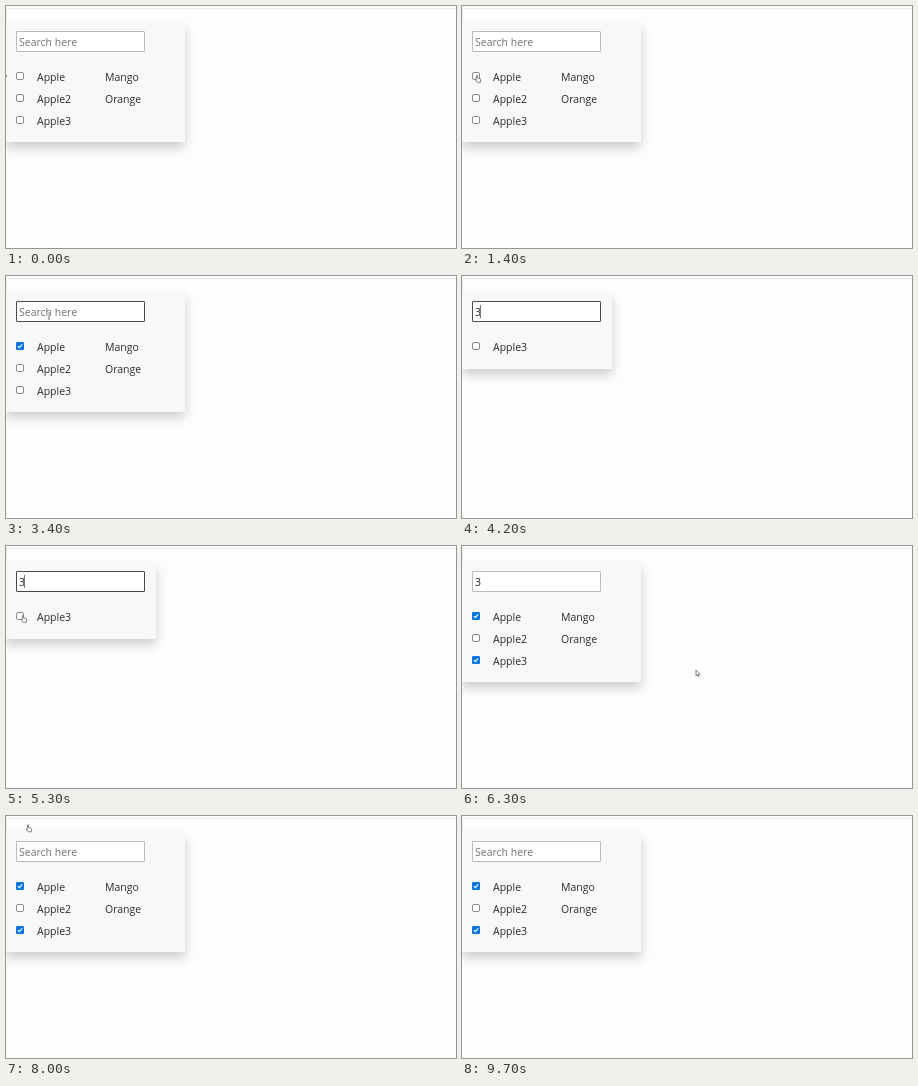
Animation of 450 by 242 pixels, one loop 9.8 s. Source, as an HTML page:

```html
<!DOCTYPE html>
<html lang="en">
<head>
<meta charset="utf-8">
<title>Searchable checkbox dropdown</title>
<style>
  html, body { margin: 0; width: 100%; height: 100%; overflow: hidden; background: #fdfdfe; }
  #stage { position: relative; width: 450px; height: 242px; overflow: hidden;
    font: 10.5px/16px "Open Sans", "Noto Sans", sans-serif; color: #2b2b2b; white-space: pre; }
  #stage * { position: absolute; box-sizing: border-box; }
  .rule { left: 0; top: 2px; width: 450px; height: 1px;
    background: repeating-linear-gradient(90deg, #e2e2e2 0 1px, #f5f5f5 1px 2px); }
  .edge { left: 0; top: 2px; width: 1px; height: 14px;
    background: repeating-linear-gradient(#e0e0e0 0 1px, #f6f6f6 1px 2px); }
  #panel { left: 0; top: 16px; background: #f8f8f8; box-shadow: 0 5.5px 11px rgba(0, 0, 0, .2); }
  #search { left: 10px; top: 9px; width: 129px; height: 21px; border: 1px solid #bcbcbc;
    border-radius: 1px; background: #fff; }
  #search.focus { border-color: #4a4a4a; }
  #query { left: 2px; top: 2px; }
  #caret { top: 3px; width: 1px; height: 13px; background: #777; }
  .label { height: 16px; }
  .box { left: 10px; width: 8px; height: 8px; border: 1px solid #8c8c8c; border-radius: 2px; background: #fff; }
  .box.on { border-color: #0874e0; border-radius: 1px; background: #0874e0; }
  .box svg { left: -1px; top: -1px; width: 8px; height: 8px; display: none; }
  .box.on svg { display: block; }
  #button { left: -1px; top: 2px; width: 84px; height: 19px; border: 1px solid #8f9296; background: #eef5fd; }
  #button span { left: 0; top: 1px; }
  #pointer { left: 0; top: 0; width: 12px; height: 14px; overflow: visible; }
</style>
</head>
<body>
<div id="stage">
  <div class="rule"></div>
  <div id="button"><span>2 values selected</span></div>
  <div id="panel">
    <div id="search"><span id="query"></span><i id="caret"></i></div>
  </div>
  <div class="edge" id="edge"></div>
  <svg id="pointer"><path id="shape" fill="#fff" stroke="#666" stroke-width=".8" stroke-linejoin="round"/></svg>
</div>
<script>
const LOOP = 9800, STEP = 100;
const $ = id => document.getElementById(id);
const panel = $('panel'), search = $('search'), query = $('query');

const SHAPES = {
  arrow: 'M0 0V5.8L1.4 4.6 2.2 6.6 3 6.2 2.2 4.3H4Z',
  hand: 'M-.6 0Q0-.9 .6 0V2.6L3.2 3.3Q3.9 3.6 3.7 4.4L3.3 6.8H.2L-1.7 4.2Q-1.5 3.3-.6 4.1Z',
  beam: 'M-1 4H1M0-3V4'
};

// time, x, y, shape from that time on
const PATH = [
  [0, -3, 66, 'arrow'], [100, -3, 66, 'arrow'], [800, 15, 69.5, 'hand'],
  [2300, 15, 69.5, 'arrow'], [2800, 43, 39, 'beam'], [3900, 43, 39, ''],
  [4500, 43, 39, 'beam'], [4700, 36, 49, 'arrow'], [5200, 17, 69.5, 'hand'],
  [5600, 17, 69.5, 'arrow'], [6200, 234, 124, 'arrow'], [6600, 234, 124, 'arrow'],
  [7200, 22, 9, 'hand'], [8400, 22, 9, 'arrow'], [9100, 203, 60, 'arrow'], [9300, 203, 60, '']
];

const ITEMS = [['Apple', 31, 0], ['Apple2', 31, 1], ['Apple3', 31, 2], ['Mango', 99, 0], ['Orange', 99, 1]]
  .map(([name, x, row]) => {
    const label = document.createElement('span');
    label.className = 'label';
    label.textContent = name;
    label.style.left = x + 'px';
    panel.append(label);
    let box = null;
    if (x === 31) {
      box = document.createElement('i');
      box.className = 'box';
      box.innerHTML = '<svg viewBox="0 0 9 9"><path d="M2 4.7 3.8 6.4 7 2.7" fill="none" stroke="#fff" stroke-width="1.3"/></svg>';
      panel.append(box);
    }
    return { name, row, label, box };
  });

const show = (el, on) => { el.style.display = on ? '' : 'none'; };

function movePointer(t) {
  let i = PATH.length - 1;
  while (PATH[i][0] > t) i--;
  const [t0, x0, y0, kind] = PATH[i];
  const [t1, x1, y1] = PATH[i + 1] || [LOOP, x0, y0];
  const p = (t - t0) / (t1 - t0), e = p * p * (3 - 2 * p);
  $('pointer').style.transform = `translate(${x0 + (x1 - x0) * e}px, ${y0 + (y1 - y0) * e}px)`;
  show($('pointer'), kind);
  if (kind) $('shape').setAttribute('d', SHAPES[kind]);
}

function draw(t) {
  const open = t < 6500 || t >= 7700;
  const filtered = t >= 3900 && t < 5500;
  const typed = t >= 3900 && t < 7700;
  const focused = t >= 2900 && t < 5500;
  const checked = { Apple: t >= 2200, Apple3: t >= 5500 };

  show(panel, open);
  show($('edge'), open);
  show($('button'), !open);
  panel.style.width = (filtered ? 149.5 : 178.5) + 'px';
  panel.style.height = (filtered ? 76.5 : 120) + 'px';

  search.className = focused ? 'focus' : '';
  query.textContent = typed ? '3' : 'Search here';
  query.style.color = typed ? '#222' : '#707070';
  $('caret').style.left = typed ? '7px' : '2px';
  show($('caret'), focused && Math.floor((t - 2900) / 500) % 2 === 0);

  for (const { name, row, label, box } of ITEMS) {
    const visible = !filtered || name.includes('3');
    const y = (filtered ? 0 : row) * 21.8;
    show(label, visible);
    label.style.top = 47 + y + 'px';
    if (!box) continue;
    show(box, visible);
    box.style.top = 50.4 + y + 'px';
    box.classList.toggle('on', !!checked[name]);
  }
  movePointer(t);
}

const start = performance.now();
function tick() {
  const t = (performance.now() - start) % LOOP;
  draw(Math.floor(t / STEP) * STEP);
  requestAnimationFrame(tick);
}
tick();
</script>
</body>
</html>
```
